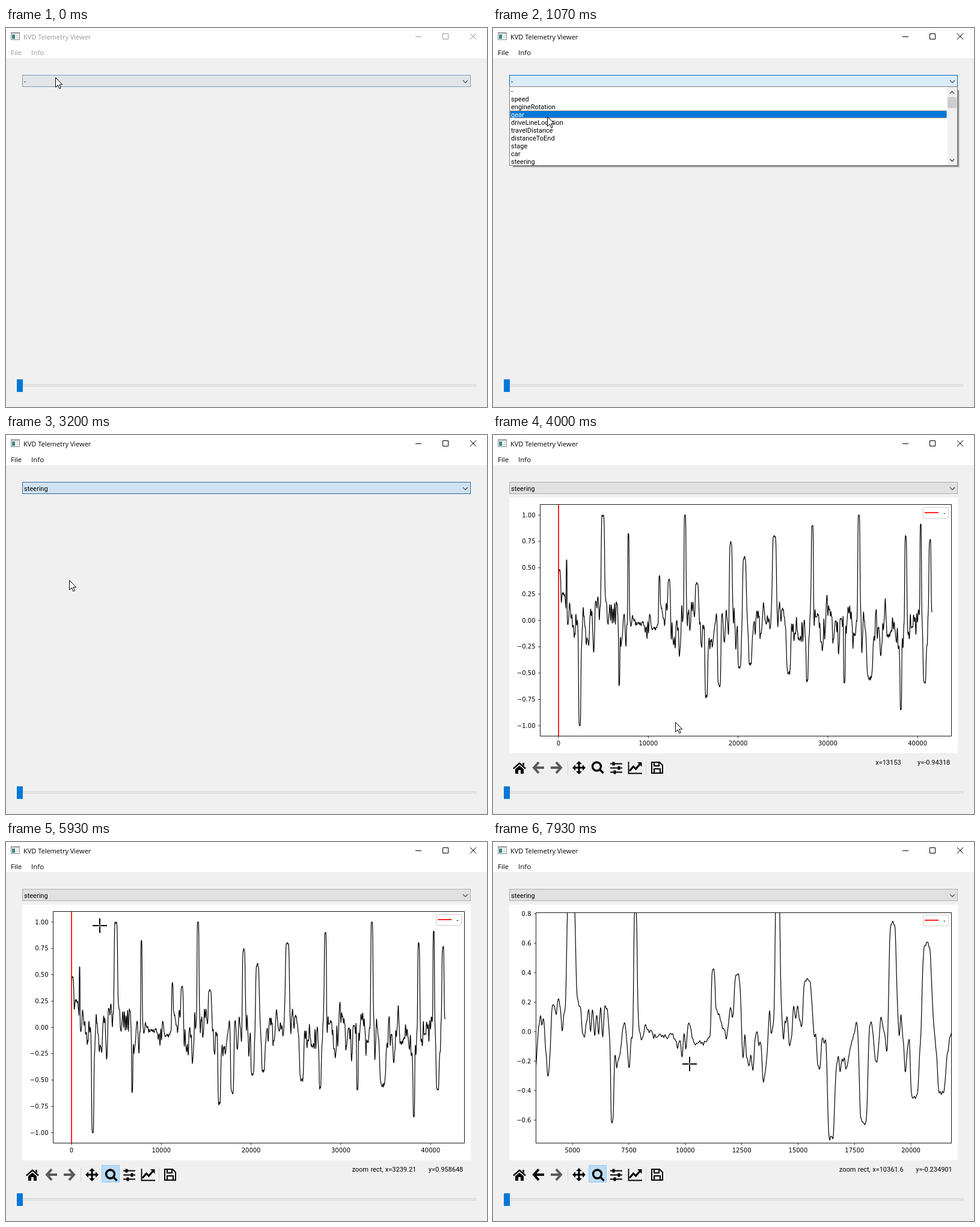
An HTML page for the animation above (8 s loop, 800x630 px).

```html
<!DOCTYPE html>
<html lang="en">
<head>
<meta charset="utf-8">
<title>Telemetry Viewer</title>
<style>
  html, body { margin: 0; width: 800px; height: 630px; overflow: hidden; background: #f0f0f0; }
  svg { position: absolute; left: 0; top: 0; display: block; }
  .ui { font: 11px Roboto, sans-serif; }
  .tick { font: 10px "DejaVu Sans", sans-serif; }
  #win { font: 11px "Open Sans", sans-serif; fill: currentColor; stroke: none; }
  #win .menu { font-size: 11.5px; }
  #win path { fill: none; stroke: currentColor; }
  .btn { fill: none; stroke: none; }
  .btn.hover { fill: #d8e9f7; stroke: #c0dcf3; }
  .btn.on { fill: #bcdcf4; stroke: #90c8f6; }
  .line { fill: none; stroke: #000; }
  #coords { position: absolute; right: 26px; width: 400px; top: 538px; line-height: 13px;
            text-align: right; white-space: pre; word-spacing: .7px; color: #000; }
</style>
</head>
<body>
<svg id="stage" width="800" height="630" viewBox="0 0 800 630">
  <rect width="800" height="50" fill="#fff"/>
  <g>
    <rect x="8.5" y="7.5" width="14" height="12" fill="#f3f6f8" stroke="#8b9096"/>
    <path d="M9 9h13" stroke="#b9bfc5" stroke-width="2"/>
    <rect x="10" y="11" width="5" height="7" fill="#3d8580"/>
    <path d="M17 12.5h4M17 15.5h4" stroke="#c3cbd2"/>
  </g>
  <g id="win">
    <text x="29" y="19">KVD Telemetry Viewer</text>
    <text class="menu" x="8" y="45">File</text>
    <text class="menu" x="42" y="45">Info</text>
    <path d="M681 14.5h10M726.5 9.5h9v9h-9zM772 9l10 10M782 9l-10 10"/>
  </g>

  <g class="ui">
    <rect id="combo" x="27.5" y="78.5" width="745" height="19"/>
    <text id="choice" x="30" y="93"></text>
    <path d="M760 87l4 4 4-4" fill="none" stroke="#444" stroke-width="1.2"/>
  </g>

  <rect x="18.5" y="592.5" width="763" height="3" fill="#e7eaea" stroke="#d6d6d6"/>
  <rect x="18" y="584" width="10" height="21" fill="#0078d7"/>

  <g id="panel">
    <rect x="27" y="104" width="746" height="425" fill="#fff"/>
    <g id="plots"></g>
    <g id="buttons"></g>
    <path d="M124.5 541v24M254.5 541v24" stroke="#d2d2d2"/>
    <path d="M34 554.5l10-9 10 9" class="line" stroke-width="2.4"/>
    <path d="M49 545h3v5l-3-2zM37 555.5l7-6 7 6V563h-5v-6h-4v6h-5z"/>
    <g id="back" fill="none" stroke-width="4"><path id="arrow" d="M76 544l-8 9 8 9M68 553h17"/></g>
    <g fill="none" stroke="#5a5a5a" stroke-width="4" transform="matrix(-1 0 0 1 181 0)"><use href="#arrow"/></g>
    <path d="M135 553h16M143 545v16" class="line" stroke-width="3"/>
    <path d="M132 553l5-5v10zM154 553l-5-5v10zM143 542l-5 5h10zM143 564l-5-5h10z"/>
    <g id="lens" class="line" stroke-width="3.4"><circle cx="172.5" cy="551" r="7"/><path d="M177.5 556l6 6"/></g>
    <path d="M195 546.5h20M195 553.5h20M195 560.5h20" class="line" stroke-width="2.2"/>
    <path d="M198.5 543.5h4v6h-4zM207.5 550.5h4v6h-4zM200.5 557.5h4v6h-4z"/>
    <path d="M225.5 543v19.5H248" class="line" stroke-width="1.8"/>
    <path d="M227 558.5l6.5-7.5 4 4 7-8" class="line" stroke-width="3"/>
    <path d="M240 544h7.5v7.5z"/>
    <path d="M264 544h13l5 5v13h-18zM268 544v6h8v-6M268 562v-7h10v7" class="line" stroke-width="2"/>
    <path id="band" class="line" stroke-dasharray="1 2"/>
  </g>

  <g id="popup" class="ui">
    <path d="M33 104H776V232H33z" opacity=".13"/>
    <path d="M33 103H775V231H33z" opacity=".2"/>
    <path d="M33 102H774V230H33z" opacity=".25"/>
    <rect x="27.5" y="97.5" width="745" height="131" fill="#fff" stroke="#7d7d7d"/>
    <rect x="756" y="98" width="16" height="130" fill="#f0f0f0"/>
    <rect x="756" y="115" width="15" height="18" fill="#cdcdcd"/>
    <path d="M760 109l3.5-3.5 3.5 3.5M760 218l3.5 3.5 3.5-3.5" fill="none" stroke="#505050" stroke-width="1.7"/>
    <rect id="mark" x="28.5" width="726" height="12" fill="#0078d7" stroke="#e08a3c" stroke-dasharray="1 1"/>
    <g id="rows"></g>
  </g>

  <path id="hand" d="M.5.5v16l3.8-3.6 2.6 6 2.4-1-2.6-5.9h5.1z" fill="#fff" stroke="#000"/>
  <g id="cross" class="line">
    <path d="M-12 0h10M2 0h10M0-12v10M0 2v10" stroke-width="2"/>
    <path d="M-2 0h4M0-2v4"/>
  </g>
</svg>
<div id="coords" class="ui"></div>

<script>
const LOOP = 8000, TICK = 200 / 3;
const $ = id => document.getElementById(id);
const mix = (a, b, f) => a + (b - a) * f;
const clamp = (v, lo = 0, hi = 1) => Math.min(hi, Math.max(lo, v));
const show = (id, on) => $(id).style.display = on ? "" : "none";

// Sharpest corners of the drive: centre in hundreds, half width, steering in percent
const corners = [
  [1, 1.7, 48], [5.4, 2.4, 25], [9, .5, 57], [23.6, 1.4, -100], [49.4, 2.1, 100], [67.6, .7, -61],
  [77.9, .8, 84], [90, 7, -3], [106.5, 3.3, -8], [112.4, 1, 41], [123, 1.6, 38], [140.9, 1.2, 100],
  [154, 1.8, 36], [164.6, 1.7, -72], [179, 2, -62], [191.9, 1.8, 74], [201.6, 2, -46], [207, 2.3, 59],
  [213.5, 2, -41], [240.5, 2.4, 80], [256.5, 2.3, -50], [277, 1.2, -58], [282.8, 1.3, 91],
  [288.5, 2, 5], [318.5, 1, -59], [334.6, 1.3, 100], [346.5, 3.6, -55], [381.4, 1, -86],
  [386.8, 1.3, 79], [403.5, .9, 92], [407.8, 1.9, -60], [413.8, 1.3, 76]];

const rand = i => { const s = Math.sin(i * 127.1 + 3) * 43758.5; return 2 * (s - Math.floor(s)) - 1; };
function noise(x, step) {
  const u = x / step, i = Math.floor(u), f = u - i;
  return mix(rand(i), rand(i + 1), f * f * (3 - 2 * f));
}

// Restless small corrections, pulled to each corner's angle
function steer(x) {
  const road = 20 * noise(x, 2.6) + 12 * noise(x + 500, .9) - 6;
  const y = corners.reduce((v, [c, w, h]) => mix(v, h, 1 / (1 + ((x - c) / w) ** 6)), road);
  return clamp((y + 2 * noise(x, .5)) / 100, -1, 1);
}
const data = Array.from({ length: 2081 }, (_, i) => [i * 20, steer(i / 5)]);

// mouse: pixel and value of one known point, with units per pixel
const views = [
  { left: 78.5, top: 115.5, legend: 120.5, x: v => 109 + v / 66.985, y: v => 308.2 - v * 175.09,
    xt: [0, 10000, 5], yt: [-1, .25, 9], digits: 2,
    mouse: [305, 13153, 66.9851, 473, -.94318, .005711195] },
  { left: 71.5, top: 117.5, legend: 121.5, x: v => 71.2 + (v - 3374) / 26.65, y: v => 315.2 - v * 245,
    xt: [5000, 2500, 7], yt: [-.6, .2, 8], digits: 1,
    mouse: [333, 10361.6, 26.65, 372, -.234901, .00408] }
];

const ticks = ([start, step, n], draw) =>
  Array.from({ length: n }, (_, i) => draw(start + i * step)).join("");

function drawView(v, i) {
  const r = 762.5, b = 500.5, frame = `M${v.left} ${v.top}H${r}V${b}H${v.left}z`;
  const path = data.map(([x, y]) => v.x(x).toFixed(2) + " " + v.y(y).toFixed(2)).join("L");
  const label = n => Math.abs(n).toFixed(v.digits);
  const xt = ticks(v.xt, n => `<path d="M${v.x(n)} ${b}v3.5" class="line" stroke-width=".8"/>
    <text x="${v.x(n)}" y="516" text-anchor="middle">${n}</text>`);
  const yt = ticks(v.yt, n => `<path d="M${v.left} ${v.y(n)}h-3.5" class="line" stroke-width=".8"/>
    <text x="${v.left - 8}" y="${v.y(n) + 3.5}" text-anchor="end">${n < -.01 ? "\u2212" : ""}${label(n)}</text>`);
  return `<g id="view${i}" class="tick">
    <clipPath id="clip${i}"><path d="${frame}"/></clipPath>
    <g clip-path="url(#clip${i})">
      <path d="M${path}" class="line" stroke-width="1.2" stroke-linejoin="round"/>
      <path d="M${v.x(0)} ${v.top}V${b}" stroke="red" stroke-width="1.7"/>
    </g>
    <path d="${frame}" class="line" stroke-width=".9"/>
    ${xt}${yt}
    <rect x="715.5" y="${v.legend}" width="42" height="18" rx="2" fill="#fff" fill-opacity=".8" stroke="#ccc"/>
    <path d="M718 ${v.legend + 8.5}h23" stroke="red" stroke-width="1.7"/>
    <text x="749" y="${v.legend + 12.5}">-</text></g>`;
}
$("plots").innerHTML = views.map(drawView).join("");

const channels = ["-", "speed", "engineRotation", "gear", "driveLineLocation", "travelDistance",
  "distanceToEnd", "stage", "car", "steering"];
$("rows").innerHTML = channels.map((c, i) => `<text x="30" y="${109 + 13 * i}">${c}</text>`).join("");

const buttonX = [29, 128, 159, 190, 221, 258];
$("buttons").innerHTML = buttonX.map(x => `<rect class="btn" x="${x + .5}" y="537.5" width="29" height="28"/>`).join("");
const buttons = [...$("buttons").children];

// Pointer path: tick, x, y
const route = [
  [0, 82, 82], [12, 82, 82], [16, 90, 147], [27, 86, 221],   // open the list, browse
  [47, 86, 221], [59, 313, 457], [60, 303, 477],             // pick, move over the plot
  [68, 81, 564], [72, 142, 561], [77, 173, 553],             // to the zoom button
  [85, 172, 158], [92, 144, 125], [95, 144, 125], [96, 159, 166], [99, 159, 166],
  [102, 198, 207], [103, 273, 277], [108, 434, 440],         // drag the zoom box
  [114, 434, 440], [118, 357, 384], [119, 327, 369]];

function pointer(k) {
  const i = Math.max(1, route.findIndex(p => p[0] >= k));
  const [a, b] = [route[i - 1], route[i]], f = clamp((k - a[0]) / (b[0] - a[0]));
  return [Math.round(mix(a[1], b[1], f)), Math.round(mix(a[2], b[2], f))];
}

const looks = {
  normal: [[225, 225, 225], [173, 173, 173]],
  hover: [[229, 241, 251], [0, 120, 215]],
  press: [[204, 228, 247], [0, 84, 153]]
};
function paintCombo(from, to, f) {
  ["fill", "stroke"].forEach((name, i) => $("combo").setAttribute(name,
    `rgb(${looks[from][i].map((c, j) => Math.round(mix(c, looks[to][i][j], clamp(f))))})`));
}

const short = n => String(Number(n.toPrecision(6))).padEnd(12);

function draw(t) {
  const k = Math.floor((t + 5) / TICK);
  const [px, py] = pointer(k), [mx, my] = pointer(k - .2);   // plot hears the mouse a little late
  const open = k >= 12 && k < 47, plotted = k >= 50, zoomMode = k >= 76, zoomed = k >= 109;

  $("win").style.color = k < 12 ? "#999" : "#000";
  if (k < 12) paintCombo("normal", "hover", .3 + k * .175);
  else if (k < 47) paintCombo("hover", "press", (k - 12) / 10);
  else paintCombo("press", "normal", (k - 46) / 8);
  $("choice").textContent = k < 47 ? "-" : "steering";

  show("popup", open);
  const row = clamp(Math.floor((py - 98) / 13), 0, 9);
  $("mark").setAttribute("y", 98.5 + 13 * row);
  [...$("rows").children].forEach((r, i) => r.setAttribute("fill", i === row ? "#fff" : "#000"));

  show("panel", plotted);
  show("view0", !zoomed);
  show("view1", zoomed);
  $("back").setAttribute("stroke", zoomed ? "#000" : "#5a5a5a");
  $("lens").setAttribute("transform", zoomMode ? "translate(1 1)" : "");
  buttons.forEach((b, i) => {
    const over = px >= buttonX[i] && px < buttonX[i] + 30 && py >= 537 && py < 566;
    b.setAttribute("class", "btn" + (zoomMode && i === 2 ? " on" : over ? " hover" : ""));
  });

  const drag = k >= 100 && !zoomed;
  show("band", drag);
  if (drag) {
    const x = 159.5, y = 166.5, w = mx - 159, h = my - 166;
    $("band").setAttribute("d", `M${x} ${y}h${w}M${x} ${y}v${h}M${x} ${y + h}h${w}M${x + w} ${y}v${h}`);
  }

  const view = views[+zoomed];
  const inside = plotted && mx > view.left && mx < 762 && my > view.top && my < 500;
  const [ax, vx, sx, ay, vy, sy] = view.mouse;
  $("coords").textContent = !inside ? "" : (zoomMode ? "zoom rect, " : "") +
    `x=${short(vx + (mx - ax) * sx)} y=${short(vy - (my - ay) * sy)}`;

  const cross = zoomMode && inside;
  show("cross", cross);
  show("hand", !cross);
  $(cross ? "cross" : "hand").setAttribute("transform", `translate(${px} ${py})`);
}

function loop() {
  draw(performance.now() % LOOP);
  requestAnimationFrame(loop);
}
loop();
</script>
</body>
</html>
```
